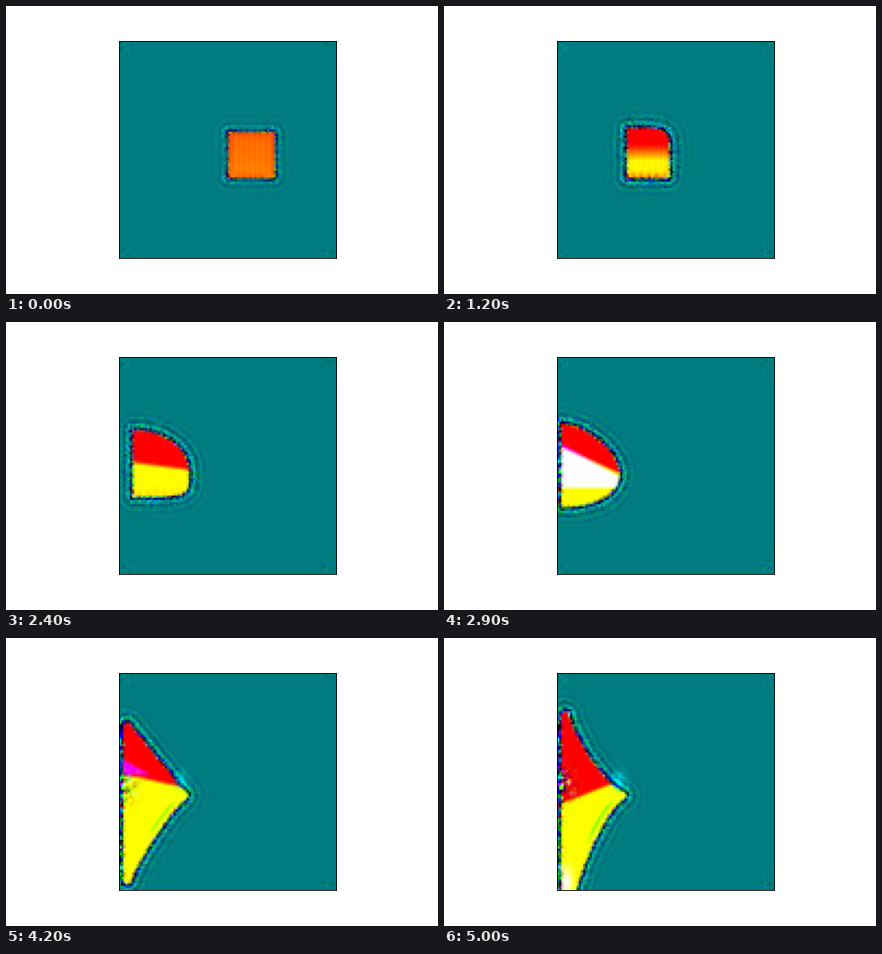
Write a matplotlib script that moves like this. It is 432 by 288 pixels and loops after 5100 ms.

```python
import numpy as np
import matplotlib.pyplot as plt
from matplotlib.animation import FuncAnimation
from matplotlib.path import Path

FRAMES, STEP = 51, 100
N = 100                       # cells per side
LEFT, TOP, SIDE = 112.7, 34.6, 217.4
REST_G, REST_B = 0.486, 0.502

cells = (np.arange(N) + 0.5) * SIDE / N
X, Y = np.meshgrid(LEFT + cells, TOP + cells)
POINTS = np.column_stack([X.ravel(), Y.ravel()])
NOISE = np.random.default_rng(4).normal(size=(3, N, N))


def bump(v, centre, width):
    return np.exp(-((v - centre) / width) ** 2)


def spot(x, y, rx, ry):
    return bump(X, x, rx) * bump(Y, y, ry)


def ramp(v):
    return np.clip(v + 0.5, 0, 1)


def smooth(t, start, end):
    s = np.clip((t - start) / (end - start), 0, 1)
    return s * s * (3 - 2 * s)


def hinge(v, width):
    """Zero below 0, v above it, with a soft bend."""
    return width * np.logaddexp(0, v / width)


def body_box(t):
    """Left, right, top and bottom of the body; it stops at the wall."""
    left = max(117, 222 - 2.61 * t - 0.0565 * t * t)
    right = 175 + hinge(93 - 3.6 * t, 4) + 6 * smooth(t, 29, 37)
    top = 127 - 1.4 * hinge(t - 11, 4)
    bottom = 172 + 5.2 * hinge(t - 27.5, 2.5)
    return left, right, top, bottom


def outline(t, inset):
    """Two superelliptic quarters: square at first, concave at the end."""
    left, right, top, bottom = body_box(t)
    left, right = left + inset, right - inset
    top, bottom = top + 1.4 * inset, bottom - 1.4 * inset
    tip = 150 + 8 * smooth(t, 27, 37)
    late = max(t, 2)
    upper = 5 * (12 / late) ** 1.3
    lower = min(40, 0.7 + 1.5 * (29 / late) ** 6)

    angle = np.linspace(0, np.pi / 2, 15)

    def quarter(power, end):
        x = left + (right - left) * np.cos(angle) ** (2 / power)
        y = tip + (end - tip) * np.sin(angle) ** (2 / power)
        return np.column_stack([x, y])

    return np.vstack([[left, top], quarter(upper, top)[::-1],
                      quarter(lower, bottom), [left, bottom]])


def signed_distance(poly):
    """Distance in pixels, negative inside the outline."""
    best = np.full(X.shape, np.inf)
    for (x0, y0), (x1, y1) in zip(poly, np.roll(poly, -1, axis=0)):
        dx, dy = x1 - x0, y1 - y0
        s = ((X - x0) * dx + (Y - y0) * dy) / (dx * dx + dy * dy + 1e-9)
        s = np.clip(s, 0, 1)
        best = np.minimum(best, np.hypot(X - x0 - s * dx, Y - y0 - s * dy))
    inside = Path(poly).contains_points(POINTS).reshape(X.shape)
    return np.where(inside, -best, best)


def edge_marks():
    """Faint traces along the border of the field."""
    corners = sum(spot(x, y, 6, 5) for x in (119, 322) for y in (42, 246))
    border = np.minimum(cells, SIDE - cells)
    border = np.minimum(border[:, None], border[None, :])
    return (0.06 * corners * NOISE[0] + 0.012 * bump(border, 4, 1.5)
            + 0.015 * bump(X, 319, 1.5) - 0.06 * spot(320, 39, 4, 2))


MARKS = edge_marks()


def body_velocity(t, d):
    """Vertical motion in green, horizontal motion in blue."""
    slope = np.interp(t, [22, 29, 37, 46, 50], [0, 0.45, 0, 0.4, -0.4])
    split = 147 - 6 * bump(t, 19, 4) + slope * (X - 165)
    green = ramp((Y - split) * min(0.25, 0.0025 + 0.0004 * t * t))
    early = 1 - smooth(t, 0, 25)
    green += early * (0.03 * np.cos(X * 1.15) - 0.05 - 0.12 * bump(d, 0, 4))
    green -= 0.4 * bump(t, 15, 7) * bump(Y, 172, 5) * (1 + 0.6 * np.cos(X * 0.8))

    # The rebounding wedge opens on impact and closes again.
    upper = 122 + 0.57 * (X - 117)
    lower = 118 + 48 * (smooth(t, 24, 29) - smooth(t, 38, 45))
    blue = ramp((Y - upper) / 4) * ramp((lower - Y) / 4)
    blue += smooth(t, 46, 50) * spot(122, 244, 6, 14)
    return green, blue


def field(t):
    inset = 4 * smooth(t, 24, 36)
    d = signed_distance(outline(t, inset)) - inset
    left, right, top, bottom = body_box(t)
    fresh = np.random.default_rng(100 + t).normal(size=(3, N, N))
    shift = int(round((left - 222) * N / SIDE))
    noise = 0.85 * np.roll(NOISE, shift, axis=2) + 0.4 * fresh

    mask = ramp(-d / 3)
    green, blue = body_velocity(t, d)
    red = mask.copy()
    green = REST_G + (green - REST_G) * mask
    blue = REST_B + (blue - REST_B) * mask

    # Ringing that dies away from the outline, rougher at the square's corners.
    corners = sum(spot(x, y, 7, 7) for x in (left, right) for y in (top, bottom))
    power = 0.45 + 0.55 * smooth(t, 0, 14) + 0.5 * corners * (1 - smooth(t, 0, 25))
    out = np.maximum(d, 0)
    fade = np.where(d > 0, np.exp(-out / 6), bump(d, 0, 1.5)) * power
    wave = fade * (1 - mask)
    red += 0.12 * fade * noise[0]
    green += 0.28 * fade * noise[1] - 0.5 * wave * np.cos(2 * np.pi * (out - 2) / 7)
    blue += 0.34 * fade * noise[2] - 0.2 * wave * np.cos(2 * np.pi * (out - 1) / 9)

    # Disturbance where the body presses against the wall.
    wall = smooth(t, 24, 29) * np.exp(-(X - 113) / 2.5) * (d < 6)
    knot = smooth(t, 32, 45) * spot(120, 147, 10, 15)
    blotch = (noise + np.roll(noise, 1, axis=1) + np.roll(noise, 1, axis=2)) / 1.7
    rough = 0.7 * wall + 0.8 * knot
    red += 0.5 * rough * (blotch[0] - 0.4)
    green += 0.6 * rough * blotch[1]
    blue += 0.6 * rough * (blotch[2] + 0.2)

    # Pale tip and a green streak along the lower side once the body recoils.
    recoil = smooth(t, 33, 46)
    tip = recoil * spot(174, 143, 7, 9)
    red -= 0.5 * tip + 0.5 * recoil * bump(d, -6, 1.6) * ramp((Y - 165) / 8) * ramp((X - 145) / 8)
    green += 0.3 * tip
    blue += 0.35 * tip

    rgb = np.stack([red, green + MARKS, blue + MARKS], axis=-1)
    return np.clip(rgb, 0, 1)


fig, ax = plt.subplots(figsize=(6, 4), dpi=72, facecolor="white")
fig.subplots_adjust(left=0.125, right=0.9, bottom=0.125, top=0.88)
ax.set_xticks([])
ax.set_yticks([])
image = ax.imshow(field(0))


def update(t):
    image.set_data(field(t))
    return [image]


anim = FuncAnimation(fig, update, frames=FRAMES, interval=STEP, repeat=True, repeat_delay=0)
plt.show()
```
